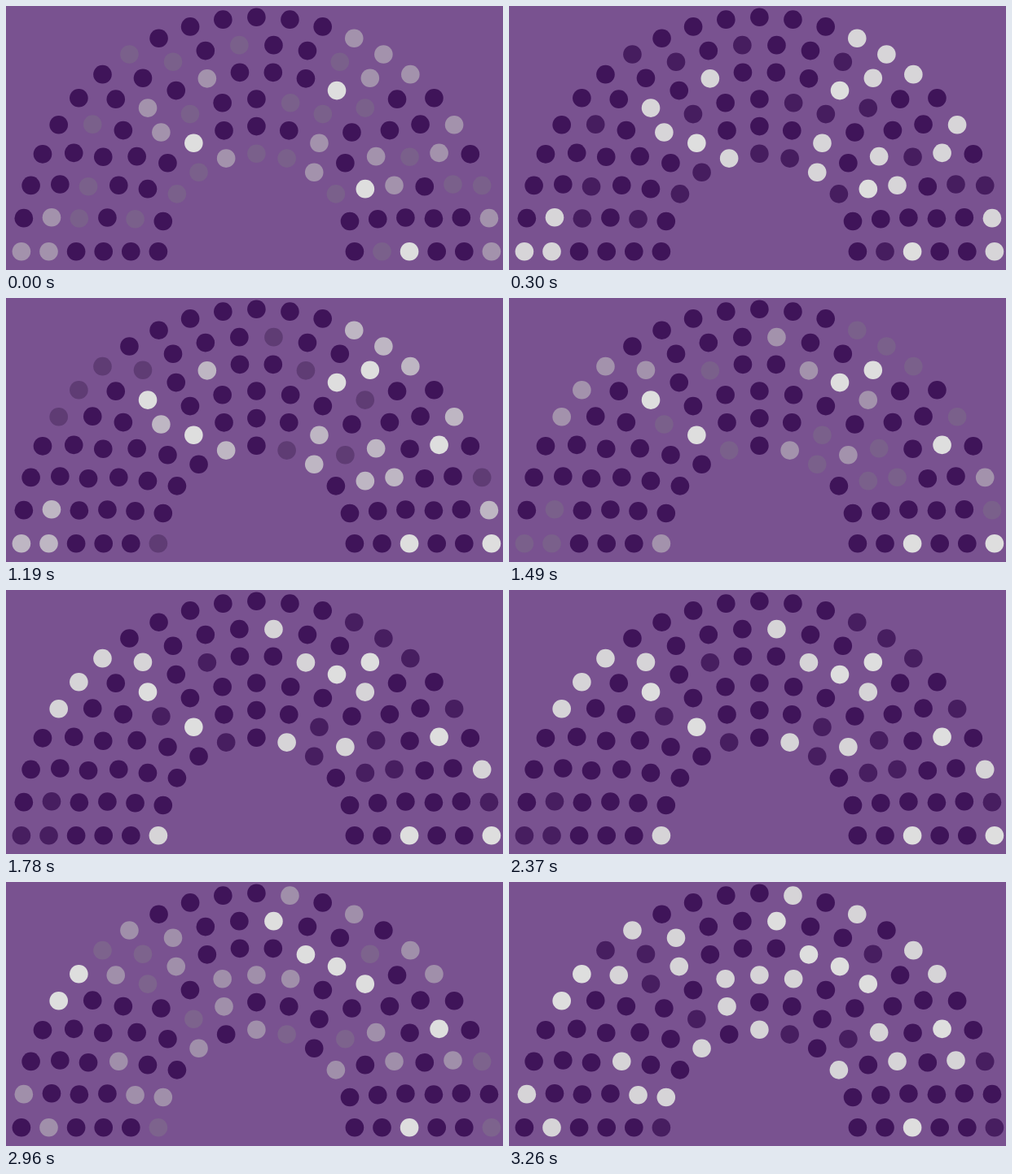
Write an HTML page that moves like this. It is 610x325 px and loops after 3.96 s.

```html
<!DOCTYPE html>
<html lang="en">
<head>
<meta charset="utf-8">
<title>Seats</title>
<style>
html, body { margin: 0; width: 100%; height: 100%; overflow: hidden; background: #795290; }
svg { display: block; width: 100%; height: 100%; }
</style>
</head>
<body>
<svg id="stage" viewBox="0 0 610 325"></svg>
<script>
const LOOP = 3960;
const FADE = 1050;
const DARK = [63, 20, 89];
const LIGHT = [222, 222, 222];
const CENTER = { x: 307.4, y: 302.2 };
const RING_SIZES = [23, 20, 18, 15, 13, 11];

// Lit seats per ring, outermost first, counted from the left.
const PATTERNS = [
  [[7, 20], [4, 7, 9, 12, 17], [1, 2, 11, 12, 14], [5, 8, 9, 14], [1, 4, 10, 12], [2, 3, 5, 6, 8]],
  [[0, 14, 15, 16, 18, 21, 22], [0, 1, 13, 16], [5, 7, 11], [4, 11, 12, 14], [4, 8, 10], [4, 7]],
  [[4, 5, 6, 20, 22], [6, 10, 13, 16], [5, 10, 11, 12], [14], [4, 9], [0, 6]],
  [[1, 4, 5, 7, 12, 14, 16, 17], [0, 5, 7, 10, 16, 17], [6, 10, 11, 12], [2, 6, 7, 8, 11, 12, 14], [1, 5], [1, 3, 5, 8]]
];

// The picture advances in steps; each fade rests just short of its end.
const STEPS = [0, 150, 300, 1040, 1190, 1340, 1490, 1630, 1780, 2670, 2820, 2960, 3110, 3260];
const FADES = [
  { from: 0, begin: -610 },
  { from: 1040, begin: 880 },
  { from: 2670, begin: 2360 }
];

const stage = document.getElementById("stage");
const seats = [];

RING_SIZES.forEach((count, ring) => {
  const radius = 288.5 - 33.6 * ring;
  for (let i = 0; i < count; i++) {
    const angle = Math.PI * i / (count - 1);
    const dot = document.createElementNS(stage.namespaceURI, "circle");
    dot.setAttribute("cx", (CENTER.x - radius * Math.cos(angle)).toFixed(2));
    dot.setAttribute("cy", (CENTER.y - radius * Math.sin(angle)).toFixed(2));
    dot.setAttribute("r", 11.3);
    stage.append(dot);
    seats.push({ dot, lit: PATTERNS.map(p => p[ring].includes(i) ? 1 : 0) });
  }
});

const ease = u => (1 - Math.cos(Math.PI * u)) / 2;

function mix(amount) {
  const rgb = DARK.map((d, k) => Math.round(d + (LIGHT[k] - d) * amount));
  return `rgb(${rgb})`;
}

function draw(time) {
  const step = STEPS.findLast(s => s <= time);
  const index = FADES.findLastIndex(f => f.from <= step);
  const p = ease((step - FADES[index].begin) / FADE);
  for (const { dot, lit } of seats) {
    const a = lit[index], b = lit[index + 1];
    dot.setAttribute("fill", mix(a + (b - a) * p));
  }
}

function tick() {
  draw(performance.now() % LOOP);
  requestAnimationFrame(tick);
}
tick();
</script>
</body>
</html>
```
